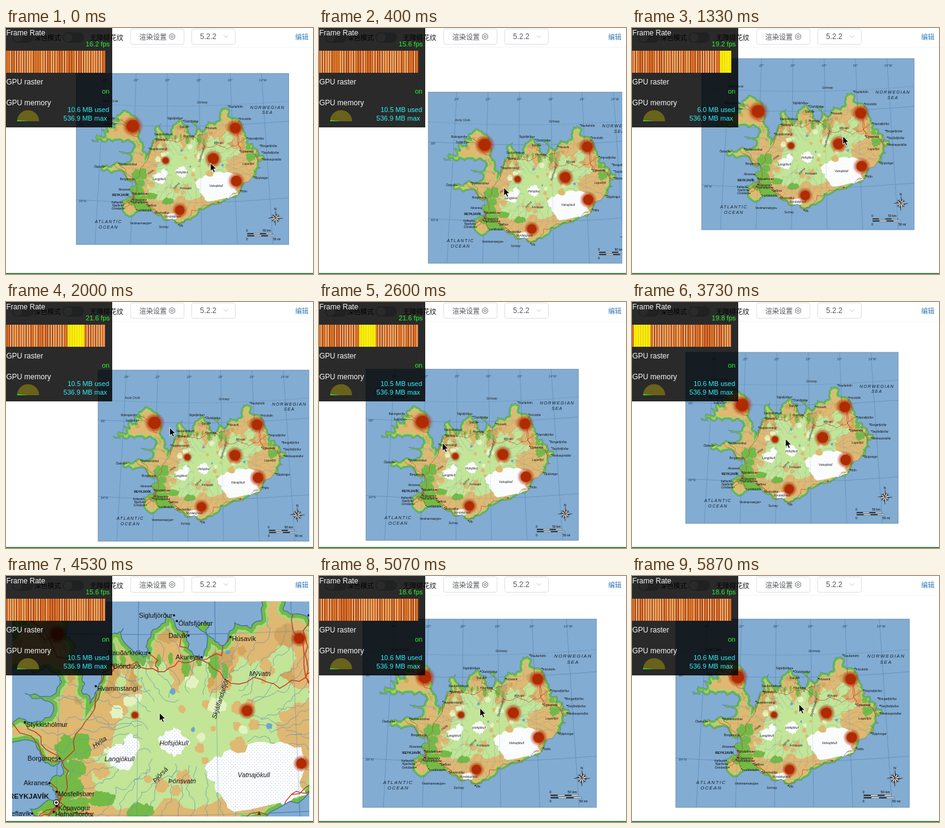
Animation, 500 px wide and 401 px high, one loop 5.93 s. Source, as an HTML page:

```html
<!DOCTYPE html>
<html lang="zh">
<head>
<meta charset="utf-8">
<style>
html, body { margin: 0; width: 100%; height: 100%; overflow: hidden; background: #fff; }
svg { display: block; width: 100vw; height: 100vh; }
text { font-family: "Liberation Sans", Arial, sans-serif; }
.ui { font-family: "Noto Sans CJK SC", "Noto Sans CJK", sans-serif; font-size: 10.8px; fill: #111; }
.town { font-size: 4.6px; fill: #111; }
.nature { font-size: 4.6px; font-style: italic; fill: #1a1a1a; }
.grid { font-size: 5.2px; font-style: italic; fill: #2f5078; }
.ocean { font-size: 7px; font-style: italic; letter-spacing: 1.4px; fill: #14202c; text-anchor: middle; }
.small { font-size: 5px; }
.end { text-anchor: end; }
.white, .green, .cyan { font-size: 12px; fill: #f6f6f6; }
.green, .cyan { font-size: 11px; fill: #2cf52c; text-anchor: end; }
.cyan { fill: #30f0f8; }
.line { stroke: #5586b8; stroke-width: .45; fill: none; }
.road { stroke: #c63a22; stroke-width: .6; fill: none; }
.river { stroke: #6796b6; stroke-width: .32; fill: none; }
</style>
</head>
<body>
<svg id="stage" viewBox="0 0 500 401"></svg>
<script>
const LOOP = 5930, STEP = 200 / 3;
const MAP = { x: 114.5, y: 74, w: 346, h: 279 };
const GREEN = '#73bb45', PALE = '#c2e598', TAN = '#dfb872', BROWN = '#d3a65d', RED = '#b02a02';

let seed = 11;
const random = () => (seed = (seed * 16807) % 2147483647) / 2147483647;
const mix = (a, b, u) => a + (b - a) * u;
const mixPoint = (a, b, u) => [mix(a[0], b[0], u), mix(a[1], b[1], u)];
const clamp = v => Math.max(0, Math.min(1, v));
const hash = n => { const v = Math.sin(n * 127.1) * 43758.5453; return v - Math.floor(v); };
const times = (n, make) => Array.from({ length: n }, (_, i) => make(i));

const path = (d, attrs) => `<path d="${d}" ${attrs}/>`;
const rect = (x, y, w, h, attrs) => `<rect x="${x}" y="${y}" width="${w}" height="${h}" ${attrs}/>`;
const circle = (x, y, r, attrs) => `<circle cx="${x}" cy="${y}" r="${r}" ${attrs}/>`;
const text = (s, x, y, style, attrs = '') => `<text x="${x}" y="${y}" class="${style}" ${attrs}>${s}</text>`;

// Midpoint displacement gives a line natural detail.
function rough(pts, amount, depth, closed) {
  if (closed) pts = [...pts, pts[0]];
  while (depth--) {
    pts = pts.flatMap((p, i) => {
      const q = pts[i + 1];
      if (!q) return [p];
      const k = (random() - .5) * amount, [x, y] = mixPoint(p, q, .5);
      return [p, [x + (q[1] - p[1]) * k, y - (q[0] - p[0]) * k]];
    });
  }
  return 'M' + pts.map(p => p.map(v => v.toFixed(1)).join(' ')).join('L') + (closed ? 'Z' : '');
}

// A row of headlands from a to b with inlets cut between them.
function fjords(a, b, count, depth) {
  const dx = b[0] - a[0], dy = b[1] - a[1], len = Math.hypot(dx, dy);
  return times(2 * count + 1, i => {
    const [x, y] = mixPoint(a, b, i / (2 * count)), d = i % 2 ? depth * (.7 + random() * .6) / len : 0;
    return [x + dy * d, y - dx * d];
  });
}

function blob(cx, cy, rx, ry, fill) {
  const pts = times(12, i => {
    const a = i * Math.PI / 6, r = .82 + random() * .36;
    return [cx + Math.cos(a) * rx * r, cy + Math.sin(a) * ry * r];
  });
  return path(rough(pts, .6, 2, true), `fill="${fill}"`);
}
function scatter(count, cx, cy, rx, ry, size, fill, tall = 1) {
  return times(count, () => {
    const a = random() * Math.PI * 2, d = Math.sqrt(random()), s = size * (.5 + random());
    return blob(cx + Math.cos(a) * rx * d, cy + Math.sin(a) * ry * d, s, s * tall, fill);
  }).join('');
}

const outline = [
  ...fjords([229,208], [214,148], 3, 5), [203,140], [190,134],
  ...fjords([181,141], [139,182], 5, 11), ...fjords([141,186], [206,187], 4, 5),
  [209,194], [184,201], [204,212], [184,219], [156,223], [155,232], [189,234], [198,249], [210,248], [200,264], [206,276],
  [188,281], [188,293], [230,299], [256,313], [283,321], [311,306], [345,287], [380,270],
  ...fjords([408,243], [422,213], 2, 7), ...fjords([420,208], [392,178], 3, 6),
  [387,165], [380,150], [363,144], [364,133], [351,131], [348,150], [340,156], [329,152], [319,168], [311,152], [303,155],
  [306,178], [297,158], [282,147], [271,162], [266,176], [252,156], [243,162], [245,180], [233,200],
];
const ring = [[208,276], [210,248], [232,212], [246,184], [276,186], [306,178], [342,190], [378,190], [410,216], [402,246],
  [368,271], [330,289], [283,318], [246,299], [208,276]];

const leftTowns = {
  'Bolungarvík': [177,147], 'Ísafjörður': [180,156], 'Siglufjörður': [287,147], 'Dalvík': [297,161], 'Akureyri': [306,176],
  'Sauðárkrókur': [270,173], 'Akranes': [201,263], 'Borgarnes': [208,246], 'Keflavík': [189,284], 'Njarðvík': [191,289],
  'Grindavík': [193,294], 'Vestmannaeyjar': [236,318], 'Ólafsvík': [161,226],
};
const rightTowns = {
  'Ólafsfjörður': [289,151], 'Húsavík': [326,162], 'Blönduós': [244,181], 'Hvammstangi': [233,196], 'Stykkishólmur': [184,221],
  'Mosfellsbær': [206,269], 'Kópavogur': [206,279], 'Hafnarfjörður': [204,283], 'Þorlákshöfn': [212,296], 'Selfoss': [229,288],
  'Hvolsvöllur': [242,300], 'Vík': [281,321], 'Höfn': [382,265], 'Djúpivogur': [404,243], 'Neskaupstaður': [417,213],
  'Seyðisfjörður': [417,202], 'Borgarfjörður': [414,191], 'Vopnafjörður': [393,179], 'Þórshöfn': [380,147],
  'Raufarhöfn': [362,127], 'Egilsstaðir': [381,200],
};
const places = {
  'Langjökull': [239,248], 'Hofsjökull': [277,237], 'Vatnajökull': [331,259], 'Mýrdalsjökull': [258,309],
  'Þórisvatn': [283,263], 'Hvíta': [232,239,-35], 'Þjórsá': [274,263,-45], 'Skjálfandafljót': [316,219,-72],
  'Mývatn': [339,189], 'Lagarfljót': [385,223], 'Grímsey': [311,123], 'Surtsey': [249,326], 'Arctic Circle': [158,121],
};

function gridLines() {
  const meridians = times(6, i => {
    const x = 161 + i * 51, lean = (i - 2.3) * 7, name = 24 - 2 * i + '°' + (i === 5 ? 'W' : '');
    return path(`M${x} 74L${x + lean} 353`, 'class="line"') + text(name, x - 4, 87, 'grid');
  });
  const parallel = (y, name, dash = '') =>
    path(`M114 ${y - 2}Q290 ${y + 10} 461 ${y - 5}`, `class="line" ${dash}`) + text(name, 119, y + 2, 'grid');
  return meridians.join('') + parallel(157, '66°') + parallel(282, '64°N') + parallel(124, '', 'stroke-dasharray="2 1.5"');
}

function rivers() {
  return times(50, i => {
    const a = i / 50 * Math.PI * 2, c = Math.cos(a), d = Math.sin(a), r = .35 + random() * .3;
    const pts = [[r * 95, r * 62], [80, 58], [110, 86]].map(([rx, ry]) => [305 + c * rx, 226 + d * ry]);
    return path(rough(pts, .5, 4), 'class="river"');
  }).join('');
}

function ice() {
  seed = 5;
  return fill => {
    seed = 5;
    return blob(344, 259, 38, 23, fill) + blob(251, 245, 10, 9, fill) + blob(258, 237, 6, 7, fill) +
      blob(286.7, 235, 10, 9, fill) + blob(270, 307, 11, 5, fill);
  };
}

function terrain(coast) {
  const shore = (color, width) => path(coast, `fill="none" stroke="${color}" stroke-width="${width}"`);
  const glacier = ice();
  return path(coast, `fill="${TAN}"`) +
    scatter(40, 285, 185, 130, 40, 6, BROWN) + scatter(8, 185, 165, 35, 20, 5, BROWN) +
    shore('#abd77c', 9) + shore(GREEN, 5.5) +
    blob(300, 234, 62, 33, PALE) + blob(275, 258, 48, 24, PALE) + blob(335, 212, 30, 18, PALE) +
    scatter(14, 300, 196, 75, 14, 6, PALE, 1.8) + scatter(6, 370, 190, 16, 18, 7, PALE) +
    scatter(12, 240, 285, 36, 14, 8, GREEN, .6) + scatter(8, 216, 252, 10, 24, 6, GREEN) +
    scatter(9, 290, 180, 70, 9, 3, GREEN, 2.4) + scatter(5, 398, 200, 10, 18, 4, GREEN) +
    scatter(16, 290, 235, 75, 36, 4, TAN) + scatter(8, 292, 225, 60, 36, 4, '#e4f2c0') +
    scatter(6, 265, 299, 22, 5, 6, TAN, .6) + scatter(5, 394, 238, 8, 14, 6, TAN) +
    rivers() + glacier('#fff') + glacier('url(#dots)') + scatter(4, 315, 215, 40, 45, 2, '#6fa3cf');
}

function roads(towns) {
  const nearest = p => ring.reduce((best, q) => Math.hypot(q[0] - p[0], q[1] - p[1]) < Math.hypot(best[0] - p[0], best[1] - p[1]) ? q : best);
  return path(rough(ring, .45, 3), 'class="road"') + towns.map(p => path(rough([p, nearest(p)], .5, 3), 'class="road"')).join('');
}

function compass() {
  const points = times(8, i => {
    const r = i % 2 ? 8 : 12, turn = `transform="rotate(${i * 45} 439 310)"`;
    return path(`M439 310L437 307L439 ${310 - r}Z`, `fill="#fff" stroke="#222" stroke-width=".3" ${turn}`) +
      path(`M439 310L441 307L439 ${310 - r}Z`, `fill="#222" ${turn}`);
  });
  return circle(439, 310, 6.5, 'fill="none" stroke="#333" stroke-width=".5"') + points.join('') + text('N', 437, 297, 'small');
}

function scaleBar() {
  const bar = (y, w) => rect(393, y, w, 1.5, 'fill="#fff" stroke="#222" stroke-width=".4"') +
    times(2, i => rect(393 + i * w / 2, y, w / 4, 1.5, 'fill="#222"')).join('');
  return bar(334.5, 41) + bar(338, 45) + text('0', 391, 332, 'small') + text('50 km', 418, 332, 'small') +
    text('0', 391, 346, 'small') + text('50 mi', 435, 346, 'small');
}

function map() {
  const coast = rough(outline, .5, 3, true), land = terrain(coast);
  const towns = [...Object.values(leftTowns), ...Object.values(rightTowns)];
  const label = (style, dx, dy) => ([name, [x, y]]) => circle(x, y, .8, 'fill="#111"') + text(name, x + dx, y + dy, style);
  const speck = p => circle(p, p, .22, 'fill="#7fa3c4"');
  return `<defs><clipPath id="land">${path(coast, '')}</clipPath>
    <pattern id="dots" width="2.4" height="2.4" patternUnits="userSpaceOnUse">${speck(.6)}${speck(1.8)}</pattern></defs>` +
    rect(MAP.x, MAP.y, MAP.w, MAP.h, 'fill="#82acd2" stroke="#63809f" stroke-width=".7"') + gridLines() +
    `<g clip-path="url(#land)">${land}${roads(towns)}</g>` +
    path(coast, 'fill="none" stroke="#39749b" stroke-width=".55"') + `<g opacity=".4">${gridLines()}</g>` +
    Object.entries(leftTowns).map(label('town end', -1, 1.5)).join('') +
    Object.entries(rightTowns).map(label('town', 1, 3)).join('') +
    Object.entries(places).map(([name, [x, y, a = 0]]) => text(name, x, y, 'nature', `transform="rotate(${a} ${x} ${y})"`)).join('') +
    circle(205.7, 276.5, 1.9, 'fill="#fff" stroke="#111" stroke-width=".5"') + circle(205.7, 276.5, .9, 'fill="#111"') +
    text('REYKJAVÍK', 173, 274, 'town', 'style="font-size:4.9px;font-weight:700"') +
    path('M344.5 285l1.3-2.6l1.3 2.6Z', 'fill="#7a2a10"') +
    text('NORWEGIAN', 426, 131.5, 'ocean') + text('SEA', 426, 140, 'ocean') +
    text('ATLANTIC', 167, 318, 'ocean') + text('OCEAN', 167, 327, 'ocean') + compass() + scaleBar();
}

function toolbar() {
  const box = (x, w) => rect(x, 1.5, w, 25, 'rx="3" fill="#fff" stroke="#dcdfe6"');
  const pill = x => rect(x, 7, 35, 17, 'rx="8.5" fill="#c4c8d0"') + circle(x + 9, 15.5, 7, 'fill="#fff"');
  const icon = 'fill="none" stroke="#606266" stroke-width=".9"';
  return rect(0, 31, 500, 1, 'fill="#f4f4f5"') + pill(92) + pill(10) +
    text('深色模式', 46, 19.5, 'ui') + text('无障碍花纹', 137, 19.5, 'ui') +
    box(203, 87) + text('渲染设置', 217, 18.5, 'ui', 'style="font-size:11.2px;fill:#55575c"') +
    path('M270.5 9l4.3 2.5v5l-4.3 2.5l-4.3-2.5v-5Z', icon) + circle(270.5, 14, 1.8, icon) +
    box(302.5, 71) + text('5.2.2', 316, 18, '', 'font-size="12" fill="#55575c"') +
    path('M354.5 12l3.5 3.5l3.5-3.5', 'fill="none" stroke="#c0c4cc"') +
    text('编辑', 471, 18.5, 'ui', 'style="fill:#337ab7"') + rect(0, 399.5, 500, 1.5, 'fill="#1f6a28"');
}

function meter() {
  return rect(0, 0, 173, 162, 'fill="#000" fill-opacity=".835"') +
    text('Frame Rate', .5, 12, 'white') + text('', 169, 30, 'green', 'id="fps"') + '<g id="bars" clip-path="url(#chart)"></g>' +
    text('GPU raster', .5, 92, 'white') + text('on', 168.5, 107, 'green') + text('GPU memory', .5, 126, 'white') +
    text('', 168, 136.5, 'cyan', 'id="used"') + text('536.9 MB max', 164.5, 150.5, 'cyan') +
    path('M18 152a18 18 0 0 1 36 0Z', 'fill="#69621a"') + path('M36 152H18l.2-1.7Z', 'fill="#2ee62e"');
}

// x, y, radius
const spots = [[206.5,160,10], [260,216,4.9], [337.5,213,8.7], [283,297,7.6], [375,249.5,8.4], [373.5,163,8.6]];

document.getElementById('stage').innerHTML = `
  <defs><clipPath id="view">${rect(10, 41.5, 484, 350.5, '')}</clipPath>
  <clipPath id="chart">${rect(0, 37, 161.5, 36, '')}</clipPath></defs>
  ${rect(0, 0, 500, 401, 'fill="#fff"')}${toolbar()}
  <g clip-path="url(#view)"><g id="map">${map()}</g><g id="spots"></g></g>
  ${meter()}
  <path id="cursor" d="M0 0V13.5L3 10.7L5.2 15.5L7.5 14.5L5.4 9.8H9.5Z" fill="#000" stroke="#fff" stroke-width=".9"/>`;
const el = Object.fromEntries(['map', 'spots', 'bars', 'fps', 'used', 'cursor'].map(id => [id, document.getElementById(id)]));

// time, x, y
const drag = [[0,114.5,74], [400,178,104.5], [600,136,114], [1330,113,48.5], [2000,150,111], [2600,76.5,109.5],
  [3000,87.5,82], [4560,87.5,82], [4800,87.5,84], [LOOP,87.5,84]];
const pointer = [[0,333,220], [400,301,260], [1330,344,175], [2600,201,229.5], [3000,250,223], [4800,250,223], [5300,272,209], [LOOP,272,209]];
// time, frames per second, megabytes used
const readings = [[0,16.2,10.6], [270,15.6,10.5], [870,19.2,6], [1870,21.6,10.5], [3070,19.8,10.6], [4200,15.6,10.5], [5070,18.6,10.6]];
const pivot = [250, 222];

function follow(keys, t) {
  const i = keys.findIndex(k => t < k[0]), a = keys[i - 1], b = keys[i];
  const u = (t - a[0]) / (b[0] - a[0]);
  return mixPoint(a.slice(1), b.slice(1), u * u * (3 - 2 * u));
}

// Wheel steps of 10 %: nine in, then eight out.
const zoomAt = t => 1.1 ** Math.round(9 * clamp((t - 3740) / 520) - 8 * clamp((t - 4560) / 240));

function drawBars(t) {
  const pitch = 3.9, first = Math.round(t / STEP), bar = (x, w, fill) => rect(x, 37, w, 36, `fill="${fill}"`);
  el.bars.innerHTML = bar(0, 162, '#c4571c') + times(42, i => {
    const n = first + i, x = i * pitch - 1;
    if (n >= 56 && n < 63) return bar(x, pitch + .1, '#fbf20a') + bar(x + 3, .4, '#c9a51a');
    return bar(x, 1.3, hash(n + 9) > .35 ? '#efdba4' : '#e08a3c') + bar(x + 2.2, .9, hash(n + 5) > .5 ? '#da741f' : '#a33a16');
  }).join('');
}

function drawSpots(t, x, y, zoom) {
  const phase = t / 4000 + .22;
  el.spots.innerHTML = spots.map(([sx, sy, r]) => {
    const disc = (size, alpha) => circle(x + (sx - MAP.x) * zoom, y + (sy - MAP.y) * zoom, r * size, `fill="${RED}" fill-opacity="${alpha}"`);
    return times(3, i => (phase + i / 3) % 1).map(p => disc(1 + .85 * p, .48 * (1 - p * p))).join('') + disc(1, 1);
  }).join('');
}

function draw(time) {
  const t = Math.floor((time % LOOP + .01) / STEP) * STEP;
  const zoom = zoomAt(t), [x, y] = follow(drag, t).map((v, i) => mix(pivot[i], v, zoom));
  el.map.setAttribute('transform', `translate(${x} ${y}) scale(${zoom}) translate(${-MAP.x} ${-MAP.y})`);
  drawSpots(t, x, y, zoom);
  drawBars(t);
  el.cursor.setAttribute('transform', `translate(${follow(pointer, t)})`);
  const [, fps, used] = readings.filter(r => r[0] <= t + 5).pop();
  el.fps.textContent = fps.toFixed(1) + ' fps';
  el.used.textContent = used.toFixed(1) + ' MB used';
}

const start = performance.now();
function tick() {
  draw(performance.now() - start);
  requestAnimationFrame(tick);
}
tick();
</script>
</body>
</html>
```
